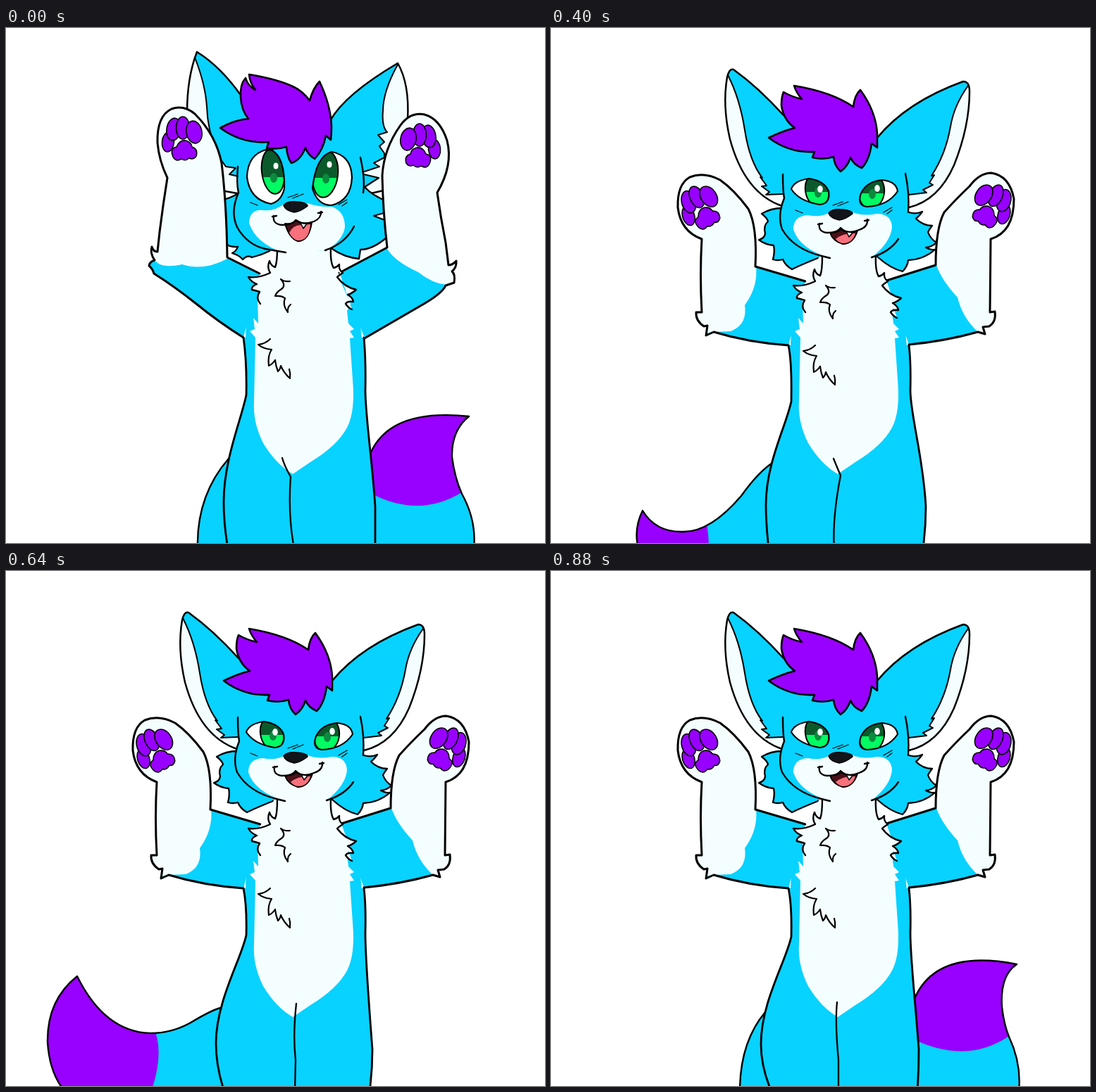
Write an HTML page with a canvas that moves like this. It is 765 px wide and 732 px high and loops after 0.96 s.

```html
<!DOCTYPE html>
<html lang="en">
<head>
<meta charset="utf-8">
<title>Dancing fox</title>
<style>
html, body { margin: 0; width: 100%; height: 100%; overflow: hidden; background: #fff; }
canvas { display: block; }
</style>
</head>
<body>
<canvas id="stage" width="765" height="732"></canvas>
<script>
const ctx = document.getElementById('stage').getContext('2d');
const BLUE = '#08d2ff', FUR = '#f5feff', PURPLE = '#9800ff', INK = '#000';
const STEP = 80;

function shape(d, fill, width) {
  const path = new Path2D(d);
  if (fill) { ctx.fillStyle = fill; ctx.fill(path); }
  if (width) { ctx.lineWidth = width; ctx.strokeStyle = INK; ctx.stroke(path); }
}

// A filled outline with a second colour kept inside it.
function patched(edge, base, patch, colour, width, patchWidth) {
  shape(edge, base);
  ctx.save();
  ctx.clip(new Path2D(edge));
  shape(patch, colour, patchWidth);
  ctx.restore();
  shape(edge, null, width);
}

function at(dy, draw) {
  ctx.save();
  ctx.translate(0, dy);
  draw();
  ctx.restore();
}

function oval(x, y, rx, ry, tilt, fill, width) {
  ctx.beginPath();
  ctx.ellipse(x, y, rx, ry, tilt, 0, Math.PI * 2);
  ctx.fillStyle = fill;
  ctx.fill();
  if (width) { ctx.lineWidth = width; ctx.stroke(); }
}

function pads(x, y, turn, side) {
  ctx.save();
  ctx.translate(x, y);
  ctx.scale(side, 1);
  ctx.rotate(turn);
  ctx.strokeStyle = INK;
  oval(-23, -12, 8.5, 14, 0.1, PURPLE, 1.6);
  oval(-15, -30, 10, 16, 0.15, PURPLE, 1.6);
  oval(-2, -32, 9.5, 16, 0, PURPLE, 1.6);
  oval(14, -26, 11, 16, -0.2, PURPLE, 1.6);
  shape('M-16 9Q-21 -3 -11 -5Q-7 -15 2 -14Q10 -12 11 -5Q20 -2 17 8Q13 14 7 11Q1 16 -4 12Q-12 17 -16 9Z', PURPLE, 1.6);
  ctx.restore();
}

function eye({ edge, iris: [x, y, rx, ry, tilt], split, shine: [sx, sy, sr] }) {
  shape(edge, '#fff');
  ctx.save();
  ctx.clip(new Path2D(edge));
  oval(x, y, rx, ry, tilt, '#0b5a2b');
  ctx.save();
  ctx.clip();
  ctx.fillStyle = '#00fb62';
  ctx.fillRect(x - 30, split, 60, 60);
  ctx.restore();
  oval(x + 1, split + 1, 5, 7, 0, '#0b8a3e');
  ctx.beginPath();
  ctx.ellipse(x, y, rx, ry, tilt, 0, Math.PI * 2);
  ctx.lineWidth = 2;
  ctx.strokeStyle = INK;
  ctx.stroke();
  oval(sx, sy, sr, sr * 1.3, 0, '#fff');
  ctx.restore();
  shape(edge, null, 2.2);
}

const face = {
  skin: 'M330 150L329 208L331 240Q321 266 328 286Q344 314 395 326L455 326Q502 310 507 262L506 208L463 155Z',
  lines: 'M329 208Q329 230 331 242Q321 266 328 286Q344 314 384 324L396 327M503 207Q509 235 507 262M493 300Q481 318 455 326',
  cheeks: [
    'M328 256Q312 256 299 264Q307 270 308 275Q301 281 304 292Q303 299 295 301Q304 308 316 309Q318 318 315 329Q322 331 329 329Q333 338 342 343Q356 336 384 325',
    'M508 262Q518 265 527 261Q523 267 518 271Q528 281 541 281Q537 286 535 290Q538 299 547 305Q541 311 532 312Q540 316 545 315Q529 329 507 330Q506 339 499 346Q482 342 463 325'
  ],
  muzzle: 'M344 286Q344 267 365 266Q382 270 396 262L428 262Q444 268 462 264Q483 264 484 283Q482 305 455 326L395 327Q352 313 344 286Z'
};

const POSES = {
  up: {
    faceY: 0, noseY: -11, chestY: -12, armpit: 440, shoulder: 349,
    skin: 'M330 95L329 197L330 235Q321 262 327 283Q340 308 390 319L455 316Q500 300 507 235L505 190L462 130L400 100Z',
    lines: 'M329 197Q327 222 330 234Q318 261 328 283Q342 308 368 314L397 319M503 184Q510 215 507 234M494 282Q482 306 453 316',
    cheeks: [
      'M330 235Q318 242 308 244L308 305Q318 312 329 311Q327 317 321 320Q331 323 336 329Q343 322 349 326Q362 323 374 317',
      'M508 208L529 213L509 226Q520 238 540 246L540 262L522 267L540 274L540 298Q520 315 503 315L501 328Q480 326 463 314'
    ],
    muzzle: 'M345 277Q346 257 365 259Q382 261 396 249L428 249Q444 255 462 254Q481 260 481 283Q478 302 455 316L395 320Q354 306 345 277Z',
    ears: [
      ['M335 98Q305 55 271 34Q257 70 257 120L300 230L328 235L345 230', 'M268 42Q283 80 285 112Q286 145 300 180L312 197L326 199L317 208L330 211L350 211L350 20L268 20Z'],
      ['M460 132Q480 95 556 50Q573 80 570 130L540 230L505 238L490 230', 'M556 52Q535 90 535 118Q533 140 541 148L528 152L537 162L530 168L537 178L537 184L522 192L530 197L503 206L450 206L440 130L460 20L558 20Z']
    ],
    arms: [
      ['M360 349L314 326Q313 250 306 192Q298 152 268 122Q252 109 235 115Q214 125 215 163Q217 188 229 213Q223 250 218 290L215 318Q209 318 207 311Q204 320 211 330Q204 332 203 338Q208 342 210 349Q240 368 270 392Q302 418 337 440', 'M190 330L213 332Q222 342 250 336Q280 346 314 328L330 100L190 100Z'],
      ['M473 348L541 312Q535 260 534 210Q536 172 560 138Q574 119 594 123Q616 129 626 160Q635 195 612 234Q617 270 624 305L628 337Q634 337 639 331Q640 340 633 346Q638 350 636 362L624 366Q620 376 595 391L509 441', 'M541 314Q552 332 585 347Q605 363 625 365L660 365L660 100L520 100Z']
    ],
    pads: [[253, 174, 0, 1], [585, 184, 0, -1]],
    eyes: [
      { edge: 'M369 173Q343 180 342 212Q346 244 376 250Q391 246 395 228Q396 185 378 174Z', iris: [379, 204, 16, 32, -0.12], split: 212, shine: [383, 196, 3.5] },
      { edge: 'M462 176Q440 182 435 228Q442 252 462 252Q490 245 491 212Q490 181 462 176Z', iris: [453, 208, 18, 33, 0.12], split: 213, shine: [459, 194, 3.5] }
    ],
    mouth: 'M396 278Q408 279 412 273Q422 280 434 276Q430 303 414 303Q402 299 396 278Z',
    tongue: 'M402 291Q408 279 420 280L432 279Q430 303 414 302Q406 300 402 291Z',
    fang: 'M418 277L422 285L427 278Z',
    smile: 'M380 267Q378 279 392 280Q407 280 411 273Q420 281 437 275Q448 270 447 261M378 268L384 267M443 263L449 262',
    hair: 'M333 98Q332 80 340 71Q343 82 354 88Q346 78 345 66Q387 73 409 84Q421 90 431 103Q436 85 445 76Q461 110 462 140Q462 150 461 159L454 153Q450 174 438 186Q428 180 425 170Q418 188 405 192Q399 184 398 169Q384 173 370 171Q371 167 373 162Q335 165 304 142Q326 130 344 129Q334 117 333 98Z'
  },
  mid: {
    ...face,
    faceY: 0, noseY: 0, chestY: 0, armpit: 451, shoulder: 360,
    ears: [
      ['M330 124Q295 85 259 59Q253 57 250 70Q243 110 254 158Q275 235 328 253L345 250L350 130', 'M251 67Q268 100 275 145Q282 190 300 213L297 212L306 224L299 225L310 233L305 237L328 236L360 236L360 40L251 40Z'],
      ['M463 156Q505 105 585 76Q594 76 594 90Q594 140 572 195Q550 245 508 255L495 250', 'M592 82Q572 110 567 140Q560 180 540 210L544 209L537 220L542 223L528 230L533 234L508 237L450 237L450 40L594 40Z']
    ],
    arms: [
      ['M361 360L290 339Q293 282 280 257Q260 230 240 216Q217 204 197 212Q179 222 180 255Q184 289 214 300Q211 350 214 404L206 404Q205 416 217 424L222 423L220 437L231 432Q280 447 337 451', 'M291 339Q294 368 275 394Q279 422 255 431L231 432L150 445L150 180L330 180Z'],
      ['M476 359L546 337Q546 285 558 262Q573 245 594 225Q608 206 625 206Q651 210 657 243Q657 290 624 300L623 404L630 403Q632 418 622 424L613 425L616 435L606 432Q560 445 508 450', 'M547 337Q554 358 577 383Q584 412 606 432L660 445L660 180L500 180Z']
    ],
    pads: [[221, 269, -0.4, 1], [617, 267, -0.4, -1]],
    eyes: [
      { edge: 'M341 229Q345 217 366 214Q388 217 394 232Q397 250 381 251Q352 246 341 229Z', iris: [378, 230, 17, 24, -0.15], split: 233, shine: [382, 229, 3.8] },
      { edge: 'M492 232Q490 218 470 216Q448 218 440 235Q434 252 448 254Q478 253 492 232Z', iris: [455, 233, 18, 24, 0.15], split: 235, shine: [463, 228, 3.8] }
    ],
    mouth: 'M396 291Q408 291 412 286Q422 294 435 288Q429 307 414 307Q400 303 396 291Z',
    tongue: 'M404 300Q414 291 432 292Q428 306 414 306Q408 305 404 300Z',
    fang: 'M419 289L423 297L428 291Z',
    smile: 'M381 278Q379 290 392 291Q407 291 411 284Q421 294 437 287Q450 283 449 272M379 279L385 278M445 274L451 273',
    hair: 'M327 110Q327 98 330 91Q342 98 356 101Q348 92 345 82Q399 91 429 112Q431 95 439 88Q461 118 463 150L463 170L455 164Q452 188 441 199Q429 194 425 184Q421 197 411 204Q402 196 401 183Q387 188 371 184L374 176Q338 178 309 156Q327 147 346 142Q330 131 327 110Z'
  },
  down: {
    ...face,
    faceY: 10, noseY: 9, chestY: 12, armpit: 464, shoulder: 372,
    ears: [
      ['M463 162L330 165Q240 174 178 191Q180 209 192 222Q222 263 296 281Q318 283 328 270L400 260', 'M178 191Q180 209 192 222Q225 246 268 250L261 260L276 257L287 264L285 257Q310 260 328 247L470 247L470 100L160 100Z'],
      ['M463 162Q550 165 646 191Q643 208 632 222Q610 270 545 285Q520 285 500 275', 'M646 191Q643 208 632 222Q600 246 556 250L565 259L541 255L543 264L528 257Q514 258 506 250L440 250L440 100L670 100Z']
    ],
    arms: [
      ['M370 374L271 392Q271 330 262 296Q255 283 237 283Q205 286 185 291Q152 292 151 320Q152 340 170 355Q182 363 197 367Q193 405 200 438Q197 445 191 446Q193 455 203 460Q200 468 205 478L215 473Q270 474 337 464', 'M271 392Q277 410 272 430Q276 455 262 474L262 490L130 490L130 260L300 260Z'],
      ['M477 371L547 385Q548 305 557 290Q568 276 587 276Q620 283 645 284Q666 291 667 315Q663 347 640 355L620 360Q623 405 618 436L627 439Q624 450 611 456Q617 460 612 470L602 463Q555 466 508 463', 'M547 385Q554 408 576 430Q582 447 602 463L690 490L690 250L530 250Z']
    ],
    fingers: 'M170 355Q190 369 215 369Q232 367 240 356M176 305Q155 313 153 334M191 318Q169 327 172 353M204 337Q187 347 192 365M640 355Q622 361 605 360Q588 356 578 347M643 296Q660 304 661 320M627 304Q650 315 646 334M612 321Q629 333 626 353',
    lids: 'M340 235Q379 230 395 261Q372 240 340 238ZM494 241Q459 233 437 260Q462 245 494 243Z',
    smile: 'M380 288Q382 298 394 298Q403 298 410 295Q425 303 438 295Q449 290 449 282M378 290L384 287M446 283L451 283',
    hair: 'M323 108Q336 108 351 111Q343 107 340 99Q382 102 426 123Q425 108 429 99Q462 128 463 160L463 178L458 170Q455 194 446 205Q435 200 431 191Q426 205 414 213Q405 205 403 191Q390 199 372 196L377 184Q338 192 310 171Q325 157 341 151Q325 134 323 108Z'
  }
};

// One bounce: pose name and vertical settling.
const BOUNCE = [['up', 0], ['up', 4], ['mid', 0], ['down', 0], ['down', -4], ['mid', 0]];

// Hips: left x, left foot x, right x, right foot x.
const HIPS = [
  [309, 315, 524, 524], [306, 312, 529, 525], [303, 308, 535, 526], [300, 303, 544, 539],
  [301, 304, 540, 535], [305, 309, 532, 528], [310, 318, 524, 522], [304, 314, 522, 519],
  [298, 310, 520, 516], [291, 307, 518, 515], [289, 306, 518, 515], [298, 313, 522, 520]
];

// Line between the legs.
const LEGS = [
  'M392 611Q395 622 404 638Q400 692 409 740', 'M398 614Q401 630 407 642Q400 690 406 740',
  'M403 617Q405 632 410 645Q397 692 403 740', 'M406 622Q409 632 416 643Q398 700 399 740',
  'M405 618Q408 630 414 641Q399 700 400 740', 'M401 612Q405 622 411 636Q399 698 402 740',
  'M397 606Q401 620 407 631Q399 702 405 740', 'M404 610Q408 630 407 650Q406 700 408 740',
  'M412 615Q407 660 411 695L410 740', 'M414 620Q407 634 409 650Q413 695 411 740',
  'M415 624L407 638Q416 690 411 740', 'M406 613Q403 642 408 695L408 740'
];

const rightTail = (edge, tip, hump) => [edge + 'L500 740', tip + 'L765 660L765 500L480 500Z', hump && hump + 'L340 740'];
const leftTail = (edge, tip) => [edge + 'L340 740', tip + 'L0 740L0 500L200 500Z'];
const TAILS = [
  rightTail('M517 605Q545 540 657 552Q632 572 633 610Q637 640 647 662Q668 700 664 740', 'M515 660Q585 698 647 660', 'M316 612Q270 665 272 740'),
  rightTail('M524 622Q560 562 682 577Q655 595 655 640Q655 665 661 685Q667 712 658 740', 'M520 664Q590 710 660 682', 'M316 612Q269 660 271 740'),
  rightTail('M532 643Q570 582 694 614Q675 630 675 665Q672 697 663 712Q658 726 645 740', 'M530 666Q600 722 667 705', 'M316 613Q268 655 271 740'),
  rightTail('M538 701Q555 693 600 696Q650 695 697 684Q707 700 695 740', 'M577 690Q580 720 592 740L765 740', 'M317 614Q260 658 268 740'),
  leftTail('M317 616Q250 670 220 740', 'M200 700L220 740'),
  leftTail('M316 617Q295 630 270 665Q225 718 185 716Q148 716 130 686Q117 712 124 740', 'M218 690Q224 715 224 740'),
  leftTail('M316 617Q300 622 285 638Q245 685 215 694Q135 706 119 642Q85 690 109 740', 'M217 685Q231 712 230 740'),
  leftTail('M310 620Q290 625 262 646Q235 668 205 672Q130 672 106 602Q52 662 82 740', 'M212 664Q226 700 218 740'),
  leftTail('M304 621Q290 625 262 642Q235 657 205 657Q140 655 101 576Q58 610 59 670Q62 715 84 740', 'M210 650Q225 685 206 740'),
  leftTail('M296 630Q260 660 210 688Q130 702 72 645Q38 690 60 740', 'M190 680Q203 715 195 740'),
  rightTail('M518 682Q570 620 671 642Q660 655 660 690Q660 720 652 740', 'M522 666Q545 710 588 740L765 740', 'M291 636Q238 675 223 740'),
  rightTail('M515 610Q545 536 661 559Q637 575 640 620Q643 645 650 662Q668 700 664 740', 'M513 665Q590 702 650 661', 'M304 627Q268 670 268 740')
];

const BELLY = 'M386 315L460 315L462 330L475 360L489 392L484 402L486 420L494 428L488 431L494 440L488 441L492 500Q496 545 484 568Q470 594 432 617L407 634Q383 620 365 590Q350 560 352 530L354 440L346 431L353 428L351 412L358 420L357 385L362 360Z';
const RUFF = [
  'M385 325Q385 345 382 352Q376 350 374 343Q370 352 375 360Q358 368 344 366Q348 373 356 376Q348 379 349 384Q354 385 360 387Q354 396 361 404',
  'M461 323Q460 345 465 353Q470 352 473 348Q472 356 478 360Q472 364 470 366Q480 380 497 384Q490 390 485 391Q492 395 493 401Q484 400 482 404Q486 410 491 412'
];
const TUFTS = 'M403 369Q395 370 390 366Q398 375 391 380Q384 384 382 390Q391 389 396 393Q392 403 400 413Q399 406 404 402M375 451Q368 458 358 459Q365 465 377 466Q371 475 373 489Q378 487 382 481Q383 490 386 497Q390 493 390 489Q394 499 403 507Q404 500 402 494';
const NOSE = 'M394 263Q399 257 412 258Q428 259 428 264Q418 272 409 273Q396 270 394 263Z';
const MARKS = 'M400 252l14 -5M407 253l15 -6M347 259l10 4M472 262l12 -7M477 264l7 -5';

function drawTail([edge, tip, hump]) {
  if (hump) shape(hump, BLUE, 2.4);
  patched(edge, BLUE, tip, PURPLE, 2.4);
}

function drawTorso(pose, [left, leftFoot, right, rightFoot], lift) {
  const pit = pose.armpit + lift;
  const drop = (right - 518) * 1.1;
  const waist = 515 + drop;
  shape(`M337 ${pit}Q342 475 341 ${waist}C335 ${waist + 32} ${left} ${610 + drop / 2} ${left} ${670 + drop / 2}` +
    `Q${left} 705 ${leftFoot} 740L${rightFoot} 740Q${right} 710 ${right} 680` +
    `C${510 + (right - 516) * 1.15} 610 510 550 510 515Q511 475 508 ${pit}`, BLUE, 2.8);
}

function drawArms(pose) {
  for (const [edge, fur] of pose.arms) patched(edge, BLUE, fur, FUR, 3);
  if (pose.fingers) shape(pose.fingers, null, 2.3);
  for (const p of pose.pads || []) pads(...p);
  // Joins the shoulders to the torso.
  const { armpit: pit, shoulder: top } = pose;
  shape(`M340 ${pit + 2}L342 ${top + 40}L362 ${top + 6}L475 ${top + 6}L500 ${top + 40}L505 ${pit + 2}Z`, BLUE);
}

function drawChest(pose, legs, lift) {
  shape(BELLY, FUR);
  shape(legs, null, 2.3);
  at(pose.chestY + lift / 2, () => RUFF.forEach(d => shape(d, FUR, 2.4)));
  at(pose.chestY * 0.75 + lift / 2, () => shape(TUFTS, null, 2.2));
}

function drawFace(pose) {
  at(pose.faceY, () => {
    shape(pose.skin, BLUE);
    shape(pose.muzzle, FUR);
    shape(pose.lines, null, 2.4);
  });
  at(pose.noseY, () => {
    shape(NOSE, '#11141a', 1.5);
    shape(MARKS, null, 1.3);
  });
  if (pose.eyes) pose.eyes.forEach(eye);
  else shape(pose.lids, INK, 2.6);
  if (pose.mouth) {
    shape(pose.mouth, '#4a1018', 2);
    shape(pose.tongue, '#f8717c');
    shape(pose.fang, '#fff', 1.5);
  }
  shape(pose.smile, null, 2.3);
}

function draw(now) {
  const step = Math.floor(now / STEP) % TAILS.length;
  const [name, lift] = BOUNCE[step % BOUNCE.length];
  const pose = POSES[name];

  ctx.fillStyle = '#fff';
  ctx.fillRect(0, 0, 765, 732);
  ctx.lineJoin = ctx.lineCap = 'round';

  drawTail(TAILS[step]);
  drawTorso(pose, HIPS[step], lift);
  at(lift, () => pose.ears.forEach(([edge, fur]) => patched(edge, FUR, fur, BLUE, 2.5, 2)));
  at(pose.faceY + lift / 2, () => pose.cheeks.forEach(d => shape(d, BLUE, 2.3)));
  at(lift, () => drawArms(pose));
  drawChest(pose, LEGS[step], lift);
  at(lift / 2, () => drawFace(pose));
  at(lift, () => shape(pose.hair, PURPLE, 2.6));
}

const start = performance.now();
function tick() {
  draw(performance.now() - start);
  requestAnimationFrame(tick);
}
tick();
</script>
</body>
</html>
```
